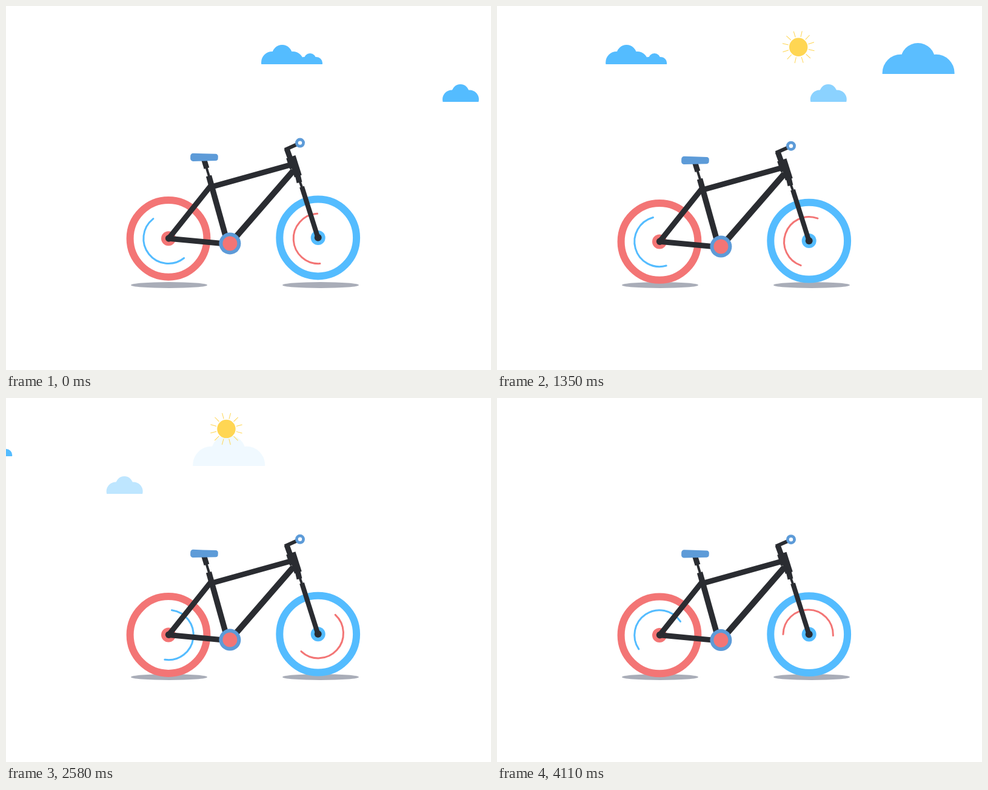
An HTML page with a canvas for the animation above (4.14 s loop, 800 by 600 pixels).

```html
<!DOCTYPE html>
<html lang="en">
<head>
<meta charset="utf-8">
<title>Bicycle ride</title>
<style>
html, body { margin: 0; width: 100%; height: 100%; overflow: hidden; background: #fff; }
canvas { display: block; width: 800px; height: 600px; }
</style>
</head>
<body>
<canvas id="stage" width="800" height="600"></canvas>
<script>
const ctx = document.getElementById('stage').getContext('2d');
const LOOP = 4140, STEP = 30, TAU = Math.PI * 2, RAD = Math.PI / 180;
const SKY = '#54bcff', RED = '#f37575', STEEL = '#5d9bd8', DARK = '#2a2c31', SUN = '#ffd653';

const clamp = v => Math.max(0, Math.min(1, v));
const ease = v => { const p = clamp(v); return p * p * (3 - 2 * p); };

// Eased value through [time, value] keys
function keyed(keys, t) {
  for (let i = 1; i < keys.length; i++) {
    const [t0, a] = keys[i - 1], [t1, b] = keys[i];
    if (t <= t1) return a + (b - a) * ease((t - t0) / (t1 - t0));
  }
  return keys[keys.length - 1][1];
}

const BOB = [[0, 0], [900, 7.43], [1800, 2.77], [2700, 7.43], [3600, 2.77], [LOOP, 7.65]];

function disc(x, y, r, color) {
  ctx.fillStyle = color;
  ctx.beginPath();
  ctx.arc(x, y, r, 0, TAU);
  ctx.fill();
}

function bar(x1, y1, x2, y2, w) {
  ctx.lineWidth = w;
  ctx.strokeStyle = DARK;
  ctx.beginPath();
  ctx.moveTo(x1, y1);
  ctx.lineTo(x2, y2);
  ctx.stroke();
}

function cloud(x, top, base, scale, alpha, tail) {
  if (alpha <= 0) return;
  const h = (base - top) / scale;
  const puffs = [[18, 29, 18], [34.5, 16.7, 16.7], [52, 29, 18]];
  if (tail) puffs.push([70, 30, 10], [80.5, 24, 10], [91, 30, 10]);
  ctx.save();
  ctx.globalAlpha = alpha;
  ctx.translate(x, top);
  ctx.scale(scale, scale);
  ctx.beginPath();
  ctx.rect(-5, -5, 120, h + 5);
  ctx.clip();
  ctx.beginPath();
  for (const [cx, cy, r] of puffs) {
    ctx.moveTo(cx + r, cy);
    ctx.arc(cx, cy, r, 0, TAU);
  }
  ctx.rect(18, 25, tail ? 73 : 34, 12);
  ctx.fillStyle = SKY;
  ctx.fill();
  ctx.restore();
}

function sun(t) {
  const alpha = Math.min(clamp(t / 1350), clamp((3920 - t) / 1220));
  if (alpha <= 0) return;
  const a = (56.8 - 0.02525 * t) * RAD;
  ctx.save();
  ctx.globalAlpha = alpha;
  ctx.translate(400 + 251.75 * Math.sin(a), 300 - 251.75 * Math.cos(a));
  disc(0, 0, 15.2, SUN);
  ctx.rotate((2.5 - 0.0225 * (t - 480)) * RAD);
  ctx.strokeStyle = SUN;
  ctx.lineWidth = 1;
  ctx.beginPath();
  for (let i = 0; i < 12; i++) {
    ctx.moveTo(0, -17);
    ctx.lineTo(0, -27);
    ctx.rotate(TAU / 12);
  }
  ctx.stroke();
  ctx.restore();
}

function sky(t) {
  cloud(421 - 525 * ease(t / 2850), 64, 96, 1, 1, true);
  cloud(720 - 814 * ease(t / LOOP), 129, 158, 0.857, 1 - t / LOOP, false);
  cloud(62 - 132 * ease(t / 1290), 87, 105, 0.57, clamp(t / 1290), true);
  const fade = Math.min(t / 1290, (2700 - t) / 1410);
  cloud(806 - 950 * ease(t / 5000), 61, 112, 1.7, clamp(fade), false);
  sun(t);
}

function shadow(x) {
  ctx.fillStyle = '#a9adb8';
  ctx.beginPath();
  ctx.ellipse(x, 460, 63, 5, 0, 0, TAU);
  ctx.fill();
}

function wheel(x, y, color, glint, turn, dx, dy) {
  ctx.strokeStyle = color;
  ctx.lineWidth = 12;
  ctx.beginPath();
  ctx.arc(x, y, 63.4, 0, TAU);
  ctx.stroke();
  disc(x, y, 12, color);
  ctx.save();
  ctx.translate(x, y);
  ctx.rotate(turn * RAD);
  ctx.strokeStyle = glint;
  ctx.lineWidth = 3;
  ctx.lineCap = 'round';
  ctx.beginPath();
  ctx.arc(dx, dy, 41.2, -90.5 * RAD, 90.5 * RAD);
  ctx.stroke();
  ctx.restore();
}

function saddle() {
  ctx.fillStyle = STEEL;
  ctx.beginPath();
  ctx.moveTo(325, 243.2);
  ctx.arcTo(350, 244, 349.5, 255, 4);
  ctx.arcTo(349.5, 255, 304, 256, 4);
  ctx.arcTo(304, 256, 304.3, 242.5, 4.5);
  ctx.arcTo(304.3, 242.5, 325, 243.2, 4.5);
  ctx.closePath();
  ctx.fill();
}

function bike(t) {
  const turn = 2975 * ease(t / LOOP);
  ctx.save();
  ctx.translate(0, keyed(BOB, t));
  wheel(268, 383.3, RED, SKY, turn + 142, 0, 0);
  wheel(514.7, 382, SKY, RED, turn + 177, -0.6, -1.5);

  // Rear triangle and main tubes
  bar(338, 296, 268.5, 383, 9);
  bar(268.5, 383.2, 362, 392, 9);
  bar(338, 298.3, 471, 261.3, 9);
  bar(474, 271.5, 371, 390, 10);
  bar(334.5, 280, 365.5, 391, 9.5);

  // Seat post
  bar(330.5, 266, 336, 284, 4);
  bar(326.6, 253, 331, 267.5, 9);

  // Stem, head tube and fork
  bar(460, 237, 484, 226.3, 6);
  bar(463, 235, 469.5, 253, 9);
  bar(466, 250, 472, 268, 8);
  bar(471.5, 248, 481.8, 280.5, 12.5);
  bar(481, 278, 484, 291, 9);
  bar(484.5, 289, 488.5, 300, 4);
  bar(488, 298, 514.6, 382, 8);

  disc(268.6, 383, 5.8, DARK);
  disc(514.7, 381.8, 6, DARK);
  saddle();
  disc(485, 225.6, 8, STEEL);
  disc(485, 225.6, 3.2, '#fff');
  disc(369.4, 391.4, 18, STEEL);
  disc(369.4, 391.4, 12, RED);
  ctx.restore();
}

function draw(t) {
  ctx.fillStyle = '#fff';
  ctx.fillRect(0, 0, 800, 600);
  sky(t);
  shadow(269);
  shadow(519);
  bike(t);
}

let start = null;
function tick(now) {
  if (start === null) start = now;
  draw(Math.floor(((now - start) % LOOP) / STEP) * STEP);
  requestAnimationFrame(tick);
}
draw(0);
requestAnimationFrame(tick);
</script>
</body>
</html>
```
